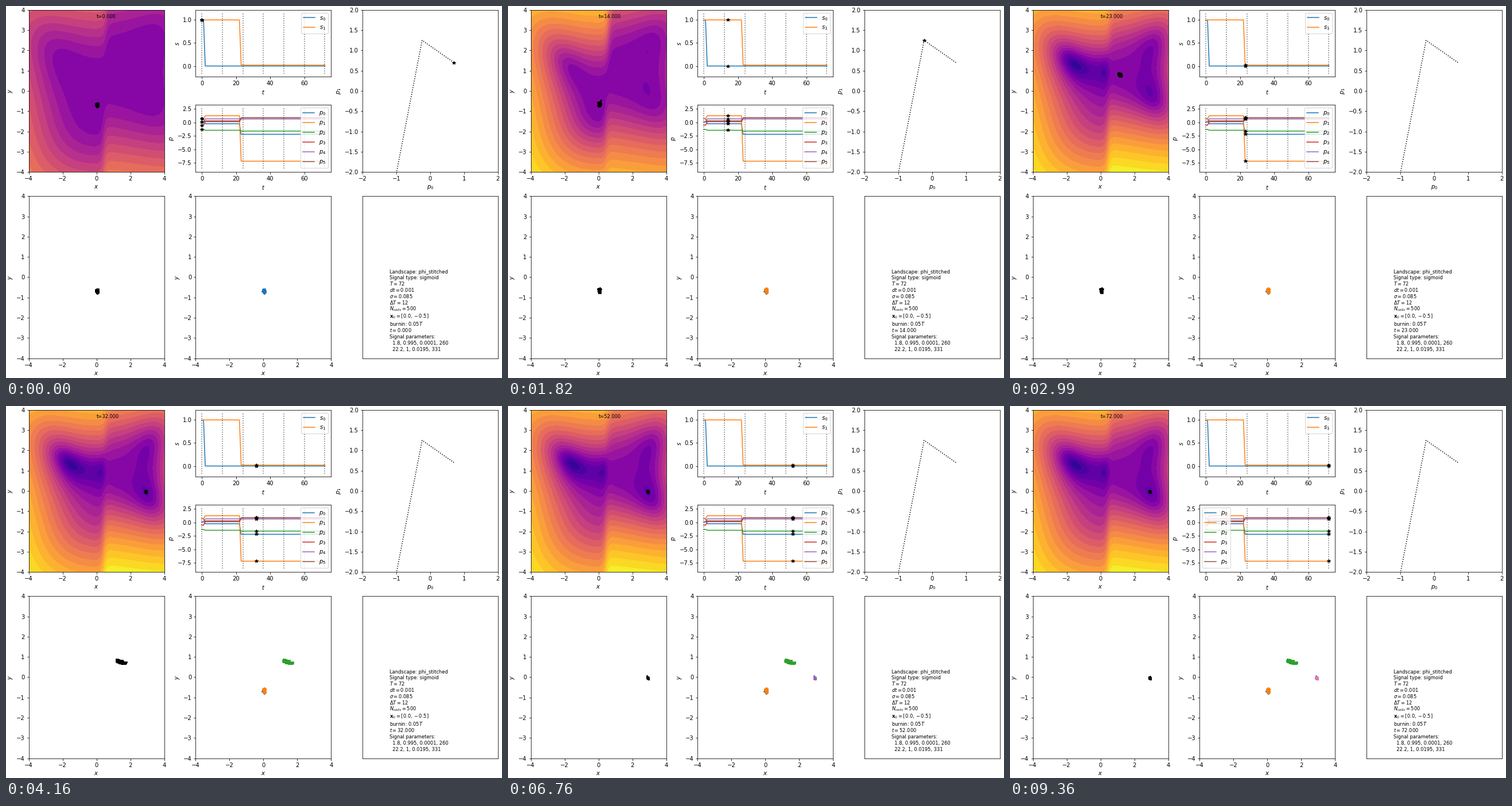
Animation of 864 by 648 pixels, one loop 9490 ms. Source, as a matplotlib script:

```python
import numpy as np
import matplotlib.pyplot as plt
from matplotlib.animation import FuncAnimation

W, H, DPI = 864, 648, 72
T, DT_SAVE, SIGMA, CELLS = 72, 12, 0.085, 500
T_SWITCH = (1.8, 22.2)

# Landscape parameters p0..p5 before, between and after the two signal switches
PARAMS = np.array([
    [0.70, 0.70, -1.30, -0.50, 0.10, 0.10],
    [-0.24, 1.25, -1.45, 0.15, 0.67, 0.30],
    [-2.20, -7.20, -1.60, 0.68, 0.67, 0.90],
])

# Panel edges in pixels from the left and top
COLS, WIDTH = (39.7, 330.4, 621.1), 235.8
TOP, BOTTOM = (6.8, 289.1), (331.3, 613.6)


def stage(t):
    return sum(t >= ts for ts in T_SWITCH)


def stitch(x):
    return 0.5 * (1 + np.tanh(6 * (x - 0.5)))


def potential(x, y, p):
    """Binary choice on the left, binary flip on the right."""
    u, v = x - 2, y - 1
    choice = x**4 + y**4 + y**3 - 4 * x**2 * y + y**2 + p[0] * x + p[1] * y
    flip = u**4 + v**4 + u**3 - 2 * u * v**2 - u**2 + p[2] * u + p[3] * v
    s = stitch(x)
    return (1 - s) * p[4] * choice + s * p[5] * flip


def velocity(x, y, p):
    u, v = x - 2, y - 1
    s = stitch(x)
    left, right = -(1 - s) * p[4], -s * p[5]
    vx = (left * (4 * x * x * x - 8 * x * y + p[0])
          + right * (4 * u * u * u + 3 * u * u - 2 * v * v - 2 * u + p[2]))
    vy = (left * (4 * y * y * y + 3 * y * y - 4 * x * x + 2 * y + p[1])
          + right * (4 * v * v * v - 4 * u * v + p[3]))
    return vx, vy


def simulate(steps=100):
    """Cell positions at every whole time unit."""
    rng = np.random.default_rng(4)
    x = rng.normal(0.035, 0.031, CELLS)
    y = rng.normal(-0.68, 0.037, CELLS)
    dt = 1 / steps
    saved = [np.column_stack((x, y))]
    for t in range(T):
        for k in range(steps):
            vx, vy = velocity(x, y, PARAMS[stage(t + k * dt)])
            noise = SIGMA * np.sqrt(dt) * rng.standard_normal((2, CELLS))
            x, y = x + vx * dt + noise[0], y + vy * dt + noise[1]
        saved.append(np.column_stack((x, y)))
    return saved


cells = simulate()
times = np.arange(T + 1)
stages = [stage(t) for t in times]
signals = np.array([[0.995, 1], [0.0001, 1], [0.0001, 0.0195]])[stages]
params = PARAMS[stages]

fig = plt.figure(figsize=(W / DPI, H / DPI), dpi=DPI)


def panel(col, top, bottom, xlabel="", ylabel=""):
    ax = fig.add_axes([COLS[col] / W, 1 - bottom / H,
                       WIDTH / W, (bottom - top) / H])
    ax.set_xlabel(xlabel)
    ax.set_ylabel(ylabel)
    return ax


def plane(col, top, bottom):
    ax = panel(col, top, bottom, "$x$", "$y$")
    ax.set(xlim=(-4, 4), ylim=(-4, 4),
           xticks=range(-4, 5, 2), yticks=range(-4, 5))
    return ax


def dots(ax, color="k", at=0):
    return ax.scatter(*cells[at].T, s=4, color=color, zorder=2)


def series(ax, data, name, span):
    """Time courses with a star on each; returns the stars and the legend."""
    lines = [ax.plot(times, col, label=f"${name}_{i}$")[0]
             for i, col in enumerate(data.T)]
    ax.vlines(range(0, T + 1, DT_SAVE), *span, colors="k",
              linestyles=":", alpha=0.6)
    ax.set(xlim=(-3.6, 75.6), xticks=(0, 20, 40, 60))
    stars = [ax.plot([], [], "k*")[0] for _ in lines]
    return stars, ax.legend(handles=lines, loc="upper right")


# Landscape
ax_phi = plane(0, *TOP)
gx, gy = np.meshgrid(np.linspace(-4, 4, 161), np.linspace(-4, 4, 161))
fields = [potential(gx, gy, p) for p in PARAMS]
floor = min(f.min() for f in fields)
maps = [ax_phi.contourf(gx, gy, np.log(1.5 + f - floor),
                        levels=np.linspace(0, 6.5, 21), cmap="plasma",
                        vmin=0, vmax=6.5) for f in fields]
phi_cells = dots(ax_phi)
clock = ax_phi.text(0.5, 0.95, "", fontsize="small",
                    transform=ax_phi.transAxes)

# Signals and parameters over time
ax_s = panel(1, TOP[0], 123.4, "$t$", "$s$")
s_stars, _ = series(ax_s, signals, "s", (-0.165, 1.15))
ax_s.set(ylim=(-0.235, 1.218), yticks=(0, 0.5, 1))

ax_p = panel(1, 172.4, TOP[1], "$t$", "$p$")
p_stars, p_legend = series(ax_p, params, "p", (-8.6, 2.65))
ax_p.set(ylim=(-9.2, 3.25), yticks=np.arange(-7.5, 2.6, 2.5))

# Parameter path
ax_path = panel(2, *TOP, "$p_0$", "$p_1$")
ax_path.plot(params[:, 0], params[:, 1], "k:")
ax_path.set(xlim=(-2, 2), ylim=(-2, 2),
            xticks=range(-2, 3), yticks=np.arange(-2, 2.1, 0.5))
path_star = ax_path.plot([], [], "k*")[0]

# Snapshots
snap_cells = dots(plane(0, *BOTTOM))
ax_all = plane(1, *BOTTOM)
layers = [dots(ax_all, f"C{i}", i * DT_SAVE) for i in range(T // DT_SAVE + 1)]

# Run summary
SUMMARY = [
    "Landscape: phi_stitched",
    "Signal type: sigmoid",
    "$T=72$",
    "$dt=0.001$",
    r"$\sigma=0.085$",
    r"$\Delta T=12$",
    "$N_{cells}=500$",
    r"$\mathbf{x}_0=[0.0, -0.5]$",
    "burnin: $0.05T$",
    "$t=0$",
    "Signal parameters:",
    "  1.8, 0.995, 0.0001, 260",
    "  22.2, 1, 0.0195, 331",
]
ax_info = panel(2, *BOTTOM)
ax_info.set(xticks=[], yticks=[])
info_x = (COLS[2] + 0.2 * WIDTH) / W
info_y = 600.5
rows = []
for line in reversed(SUMMARY):
    # Lines with a subscript reach lower
    if rows:
        info_y -= 13 if "$" in line and "_" in line else 10.9
    rows.append(fig.text(info_x, 1 - info_y / H, line, fontsize="small"))
info_time = rows[::-1][SUMMARY.index("$t=0$")]


def update(t):
    for i, m in enumerate(maps):
        m.set_visible(i == stages[t])
    phi_cells.set_offsets(cells[t])
    clock.set_text(f"t={t:.3f}")
    for stars, data in ((s_stars, signals), (p_stars, params)):
        for star, value in zip(stars, data[t]):
            star.set_data([t], [value])
    # The legend makes way once the stars reach it
    p_legend.set_loc("upper left" if t >= 59 else "upper right")
    path_star.set_data([params[t, 0]], [params[t, 1]])
    last = t // DT_SAVE
    snap_cells.set_offsets(cells[last * DT_SAVE])
    for i, layer in enumerate(layers):
        layer.set_visible(i <= last)
    info_time.set_text(f"$t={t:.3f}$")


anim = FuncAnimation(fig, update, frames=T + 1, interval=130,
                     init_func=lambda: update(0), repeat=True, repeat_delay=0)
plt.show()
```
